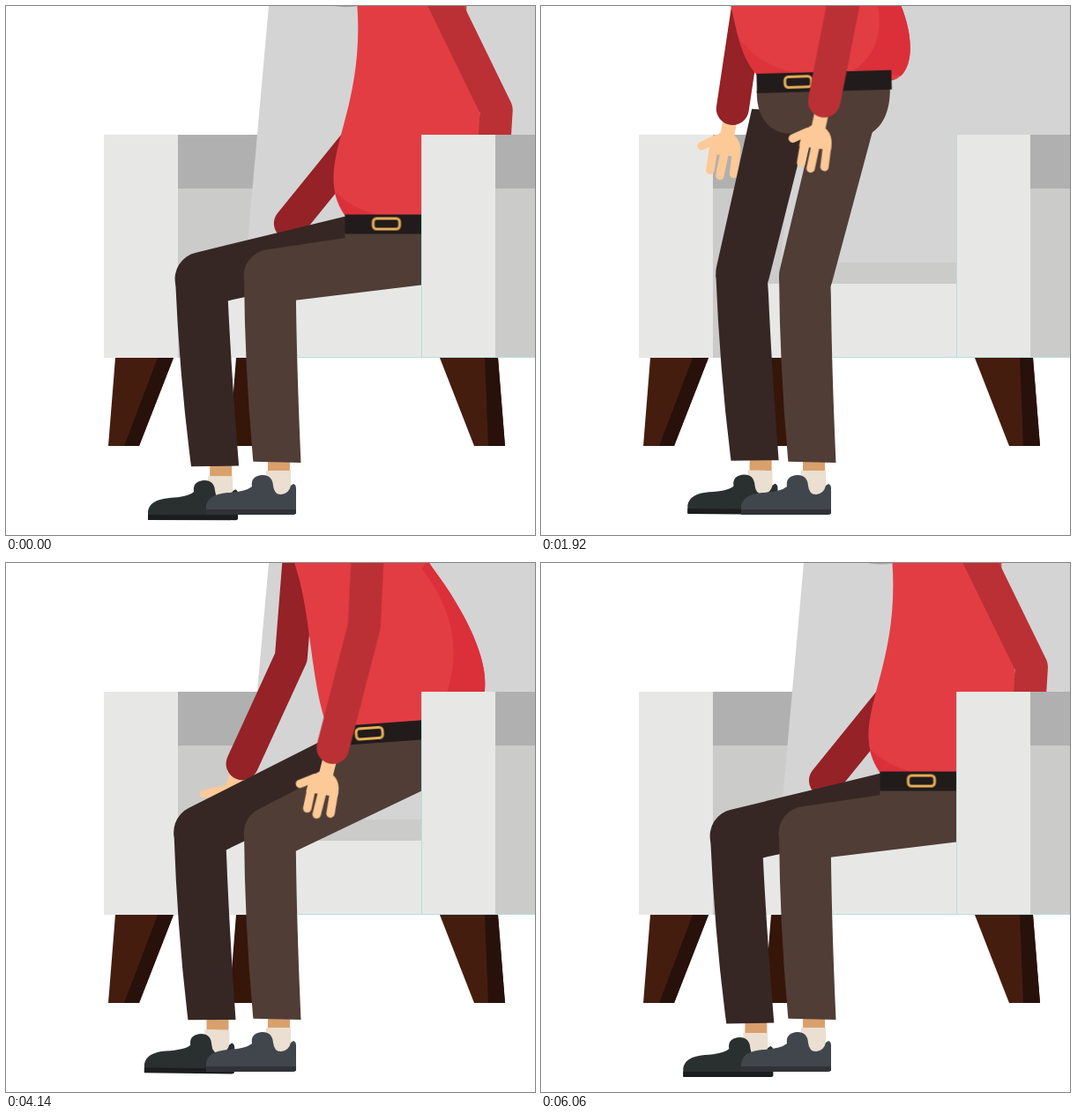
An HTML page without scripts that plays this animation: 600 px wide and 600 px high, repeating every 6.33 s.

```html
<!DOCTYPE html>
<html lang="en">
<head>
<meta charset="utf-8">
<title>Getting up from an armchair</title>
<style>
@property --a { syntax: "<angle>"; inherits: true; initial-value: -7.2deg; }
@property --b { syntax: "<angle>"; inherits: true; initial-value: -5.2deg; }

html, body { margin: 0; width: 100%; height: 100%; overflow: hidden; background: #fff; }
svg { display: block; width: 100vw; height: 100vh; }
svg, svg * { animation: 6330ms linear infinite; }
svg { animation-name: hinge; }

.near { --pants: #503d36; --shoe: #41464d; --sole: #2f3338; }
.far { --pants: #362725; --shoe: #2a3030; --sole: #1a1e1f; }
.pants { fill: var(--pants); }
.face { fill: #e7e8e6; }
.side { fill: #cbcbca; }
.top { fill: #b0b0b0; }
.wood { fill: #451d0f; }
.wood2 { fill: #28110a; }
.arm { fill: none; stroke-width: 37; stroke-linecap: round; stroke-linejoin: round; }
.far .arm { stroke: #942227; animation-name: far-arm; }
.near .arm { stroke: #bb3034; animation-name: near-arm; }
.far .hand { animation-name: far-hand; }
.near .hand { animation-name: near-hand; }

/* the body rides on the end of the near thigh but stays upright */
.body { transform: translate(300px, 306px) rotate(var(--a)) translate(195px) rotate(calc(-1 * var(--a))); }
.shift { animation-name: shift; }
.thigh { transform: rotate(var(--a)); }
.far .thigh { transform: rotate(calc(var(--a) + var(--b))); }
.knee { animation-name: knee; }
.swing { animation-name: swing; }
.hips { animation-name: hips; }
.torso { animation-name: torso; }
.shade { animation-name: shade; }
.belly { animation-name: belly; }
.chin { animation-name: chin; }

@keyframes hinge {
  0%, 93.84%, 100% { --a: -7.2deg; --b: -5.2deg; }
  9% { --a: -15.7deg; --b: 1deg; }
  21.33% { --a: -32.6deg; --b: .6deg; }
  31.28% { --a: -79.7deg; --b: -1deg; }
  41.7% { --a: -86.5deg; --b: -1.2deg; }
  43.6% { --a: -86.2deg; --b: -1.2deg; }
  52.13% { --a: -52.4deg; --b: -.4deg; }
  54.98% { --a: -41.8deg; --b: 0deg; }
  62.56% { --a: -28.7deg; --b: .2deg; }
  74.41% { --a: -16.8deg; --b: .3deg; }
}
@keyframes shift {
  0%, 21.33%, 93.84%, 100% { translate: 0 0; }
  9% { translate: 8px 0; }
  34%, 43.6% { translate: 7px 2px; }
  54.98% { translate: 1px 1px; }
  74.41% { translate: 1px 3px; }
}
@keyframes hips {
  0%, 93.84%, 100% { rotate: 0deg; }
  9% { rotate: .7deg; }
  21.33% { rotate: -9deg; }
  34%, 43.6% { rotate: 1.5deg; }
  54.98% { rotate: -7.5deg; }
  74.41% { rotate: -1.2deg; }
}
@keyframes knee {
  0%, 93.84%, 100% { translate: 222px 309px; }
  9% { translate: 220px 297px; }
  21.33% { translate: 219px 306px; }
  41.7%, 43.6% { translate: 240px 298px; }
  54.98% { translate: 221px 306px; }
  74.41% { translate: 220px 304px; }
}
@keyframes swing {
  0%, 93.84%, 100% { rotate: -4.1deg; }
  5.7% { rotate: 14deg; }
  9% { rotate: 8.1deg; }
  15.5%, 21.33% { rotate: -3.7deg; }
  41.7%, 54.98%, 64% { rotate: -4deg; }
  74.41% { rotate: -.3deg; }
}
@keyframes torso {
  0%, 93.84%, 100% { d: path("M-95 -420L-95 -282C-86 -152 -148 -102 -109 -44L44 -44C66 -102 26 -222 29 -282L29 -420Z"); }
  9% { d: path("M-200 -420L-141 -253C-124 -203 -130 -93 -108 -41L44 -41C104 -73 59 -163 -6 -253L-130 -420Z"); }
  21.33% { d: path("M-330 -420L-192 -201C-142 -171 -152 -81 -114 -27L41 -53C82 -72 68 -140 -7 -201L-200 -420Z"); }
  34%, 43.6% { d: path("M-125 -420L-128 -113C-131 -98 -130 -68 -108 -46L46 -27C66 -30 72 -70 66 -113L40 -420Z"); }
  54.98% { d: path("M-220 -420L-153 -177C-143 -132 -134 -72 -113 -29L39 -47C79 -62 69 -112 22 -177L-120 -420Z"); }
  74.41% { d: path("M-200 -420L-143 -252C-120 -197 -128 -92 -110 -41L42 -40C100 -67 60 -167 -5 -252L-130 -420Z"); }
}
@keyframes shade {
  0%, 93.84%, 100% { d: path("M45 -300Q60 -150 45 -44L200 -20L200 -420Z"); }
  9% { d: path("M-6 -253Q60 -130 20 -41L200 -20L200 -420Z"); }
  21.33% { d: path("M-24 -201Q58 -100 -9 -44L200 -20L200 -420Z"); }
  34%, 43.6% { d: path("M42 -113Q36 -66 5 -47L200 -20L200 -420Z"); }
  54.98% { d: path("M-6 -177Q58 -124 -6 -44L200 -20L200 -420Z"); }
  74.41% { d: path("M-5 -252Q62 -140 20 -41L200 -20L200 -420Z"); }
}
@keyframes belly {
  0%, 34%, 43.6%, 93.84%, 100% { opacity: 1; }
  9%, 21.33%, 54.98%, 74.41% { opacity: 0; }
}
@keyframes far-arm {
  0%, 93.84%, 100% { d: path("M-64 -342L-64 -167L-171 -35"); }
  9% { d: path("M-111 -343L-155 -138L-244 -15"); }
  21.33% { d: path("M-192 -291L-155 -106L-155 34"); }
  34%, 43.6% { d: path("M-101 -320L-101 -154L-130 -17"); }
  54.98% { d: path("M-163 -270L-151 -92L-166 33"); }
  74.41% { d: path("M-118 -322L-155 -137L-245 -20"); }
}
@keyframes far-hand {
  0%, 93.84%, 100% { translate: -171px -35px; rotate: 20deg; }
  9% { translate: -244px -15px; rotate: 36deg; }
  21.33% { translate: -155px 34px; rotate: 0deg; }
  34%, 43.6% { translate: -130px -18px; rotate: 16deg; }
  54.98% { translate: -166px 33px; rotate: 7deg; }
  74.41% { translate: -245px -20px; rotate: 38deg; }
}
@keyframes near-arm {
  0%, 93.84%, 100% { d: path("M-24 -342L63 -164L55 -32"); }
  9% { d: path("M-55 -333L-79 -156L-138 -21"); }
  21.33% { d: path("M-123 -271L-67 -149L-59 -1"); }
  34%, 43.6% { d: path("M10 -300L20 -157L-23 -15"); }
  54.98% { d: path("M-78 -247L-60 -149L-65 -4"); }
  74.41% { d: path("M-51 -332L-79 -154L-141 -22"); }
}
@keyframes near-hand {
  0%, 93.84%, 100% { translate: 55px -32px; rotate: 3deg; }
  9% { translate: -138px -21px; rotate: 24deg; }
  21.33% { translate: -59px 1px; rotate: -5deg; }
  34%, 43.6% { translate: -23px -16px; rotate: 19deg; }
  54.98% { translate: -65px -4px; rotate: 2deg; }
  74.41% { translate: -141px -22px; rotate: 25deg; }
}
@keyframes chin {
  0%, 94.5%, 100% { translate: 0 0; }
  1%, 93% { translate: 0 -12px; }
}
</style>
</head>
<body>
<svg viewBox="0 0 600 600">
  <defs>
    <path id="thigh" d="M183 -34L0 -30A30.500 30.500 0 0 0 0 31L195 32Z"/>
    <path id="shin" d="M-30 0Q-33 110 -27 212L27 215Q26 110 28 25V0Z"/>
    <g id="shoe">
      <path fill="#d9a06c" d="M-11 -2H14V12H-11Z"/>
      <path fill="#eadfd0" d="M-13 10H15V28Q12 37 3 37Q-8 36 -13 26Z"/>
      <path fill="var(--shoe)" d="M-81 59V50Q-79 37 -57 35Q-36 34 -29 28Q-31 16 -17 15Q-6 15 -5 27Q-4 37 4 37Q13 36 15 27L18 25Q21 26 21 30V59Z"/>
      <path fill="var(--sole)" d="M-81 54H21V57Q21 60 18 60H-81Z"/>
    </g>
    <g id="hand" fill="#fcc997" stroke="#fcc997" stroke-linecap="round">
      <path stroke="none" d="M-8 10H8V30Q19 36 19 53L-17 56Q-18 38 -8 30Z"/>
      <path fill="none" stroke-width="9.500" d="M-11 38L-26 49M-12 50L-11 74M1 50V78M14 50L16 73"/>
    </g>
    <clipPath id="shirt"><path class="torso"/></clipPath>
  </defs>

  <!-- chair -->
  <path class="wood" d="M124 399H190L151 499H116Z"/>
  <path class="wood2" d="M172 399H190L151 499H134Z"/>
  <path fill="#351609" d="M261 399H300L290 499H253Z"/>
  <path class="side" d="M195 146H471V399H195Z"/>
  <path class="top" d="M195 146H300V207H195Z"/>
  <path fill="#d4d4d4" d="M298 0H600V291H272Z"/>
  <path class="side" d="M230 291H471V315H230Z"/>
  <path class="face" d="M230 315H471V399H230ZM111 146H195V399H111Z"/>
  <ellipse class="chin" cx="386" cy="-8" rx="27" ry="9.5" fill="#a5a5a3"/>

  <g class="body far"><g class="shift">
    <g class="hand"><use href="#hand"/></g>
    <path class="arm"/>
  </g></g>

  <g class="far"><g class="knee">
    <g class="swing">
      <use href="#shoe" transform="translate(5 215) rotate(4.2)"/>
      <use href="#shin" class="pants"/>
    </g>
    <g class="thigh"><use href="#thigh" class="pants"/></g>
  </g></g>

  <g class="near">
    <use href="#shoe" transform="translate(308 517)"/>
    <g transform="translate(300 306)">
      <use href="#shin" class="pants" transform="translate(0 -2) rotate(-2)"/>
      <g class="thigh"><use href="#thigh" class="pants"/></g>
    </g>
  </g>

  <g class="body near"><g class="shift">
    <g class="hips"><path class="pants" d="M-109 -26C-111 5 -95 24 -72 24L10 30C30 24 42 5 42 -26Z"/></g>
    <path class="torso" fill="#e33d44"/>
    <g clip-path="url(#shirt)" fill="#db3039">
      <path class="shade"/>
      <path class="belly" d="M-140 -95Q-112 -50 -60 -42L-140 -40Z"/>
    </g>
    <g class="hips">
      <path fill="#211c1b" d="M-109 -45H44V-23H-109Z"/>
      <rect x="-77" y="-40.5" width="30" height="12" rx="4" fill="none" stroke="#e6ad5a" stroke-width="3"/>
    </g>
    <g class="hand"><use href="#hand"/></g>
    <path class="arm"/>
  </g></g>

  <!-- front armrest -->
  <path class="wood" d="M492 399H558L566 499H531Z"/>
  <path class="wood2" d="M543 399H558L566 499H547Z"/>
  <path class="face" d="M471 146H555V399H471Z"/>
  <path class="side" d="M555 207H600V399H555Z"/>
  <path class="top" d="M555 146H600V207H555Z"/>
  <path fill="none" stroke="#b9dcdd" d="M471.5 146V398.5M330 398.5H600"/>
</svg>
</body>
</html>
```
